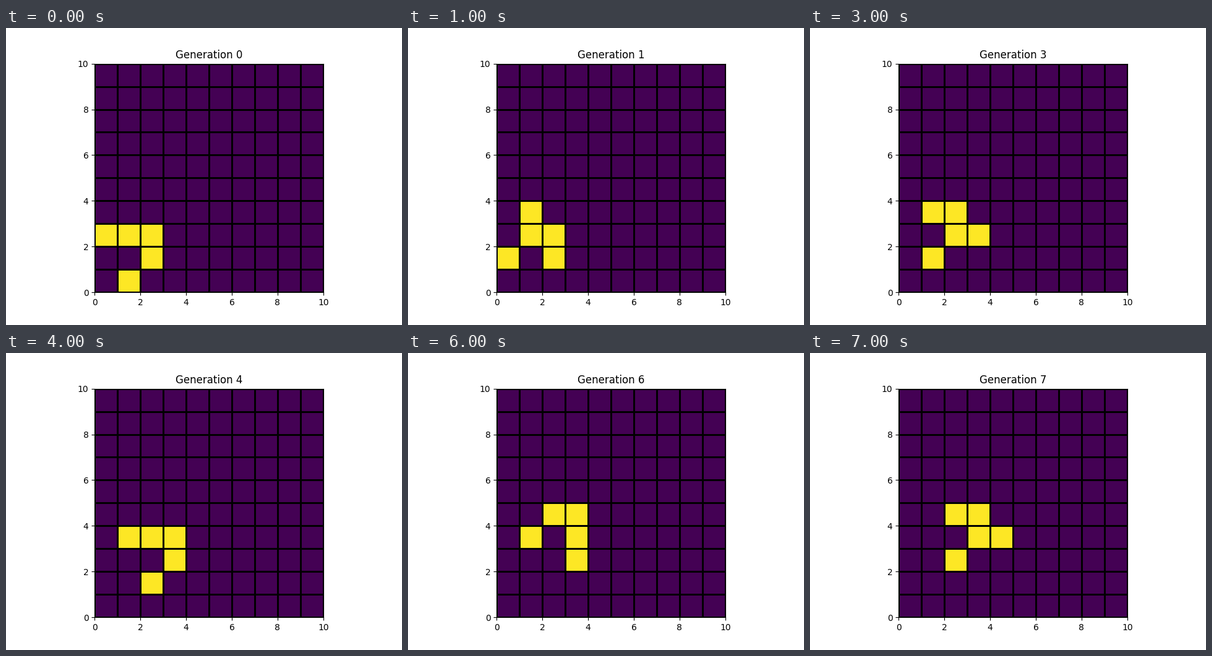
Animation of 640x480 px, one loop 8000 ms. Source, as a matplotlib script:

```python
import matplotlib.pyplot as plt
import numpy as np
from matplotlib.animation import FuncAnimation

SIZE = 10
GENERATIONS = 8
GLIDER = [(0, 1), (1, 2), (2, 0), (2, 1), (2, 2)]  # (row, column)


def step(grid):
    """Advance Conway's Game of Life by one generation on a torus."""
    neighbours = sum(
        np.roll(grid, (dy, dx), axis=(0, 1))
        for dy in (-1, 0, 1)
        for dx in (-1, 0, 1)
        if (dy, dx) != (0, 0)
    )
    return ((neighbours == 3) | ((grid == 1) & (neighbours == 2))).astype(int)


def evolve(count):
    grid = np.zeros((SIZE, SIZE), dtype=int)
    for cell in GLIDER:
        grid[cell] = 1
    history = [grid]
    while len(history) < count:
        history.append(step(history[-1]))
    return history


history = evolve(GENERATIONS)

fig, ax = plt.subplots(figsize=(6.4, 4.8), dpi=100)
ax.set_aspect("equal")
mesh = ax.pcolormesh(history[0], cmap="viridis", vmin=0, vmax=1,
                     edgecolors="k", linewidth=2)
title = ax.set_title("Generation 0")


def update(generation):
    mesh.set_array(history[generation])
    title.set_text(f"Generation {generation}")
    return mesh, title


anim = FuncAnimation(fig, update, frames=GENERATIONS, interval=1000,
                     repeat=True, repeat_delay=0)
plt.show()
```
